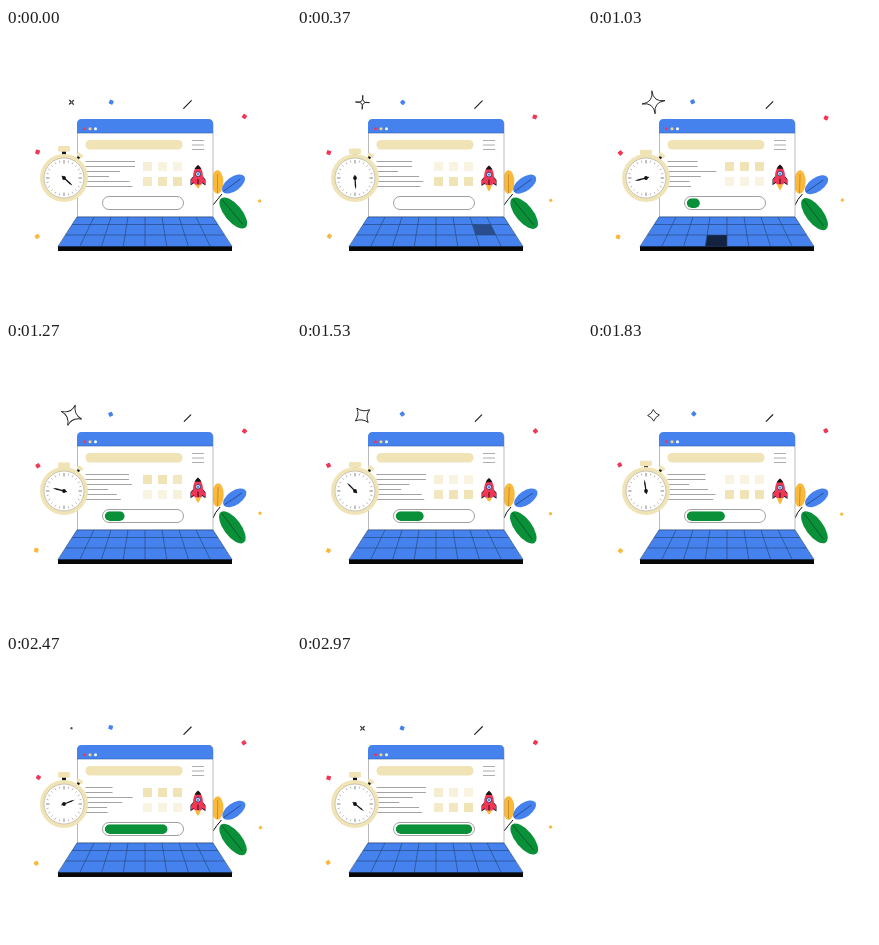
Write an HTML page that moves like this. It is 285 px wide and 285 px high and loops after 3 s.

```html
<!DOCTYPE html>
<html lang="en">
<head>
<meta charset="utf-8">
<title>Laptop loading</title>
<style>
html, body { margin: 0; width: 100%; height: 100%; overflow: hidden; background: #fff; }
svg { display: block; width: 100vw; height: 100vh; }
</style>
</head>
<body>
<svg viewBox="0 0 285 285">
  <!-- plant -->
  <g id="orange"><ellipse cx="211.500" cy="154" rx="5.800" ry="11.700" fill="#fbb93c"/><path d="M211.500 146V165" stroke="#a87419" stroke-width=".6"/></g>
  <g id="blue"><g transform="rotate(-36 227.500 156)"><ellipse cx="227.500" cy="156" rx="13.200" ry="7" fill="#4682ee"/><path d="M215 156H236" stroke="#1c3f80" stroke-width=".7"/></g></g>
  <g id="green"><g transform="rotate(50 227 185)"><ellipse cx="227" cy="185" rx="19" ry="8.600" fill="#0a9038"/><path d="M209 185H242" stroke="#064d20" stroke-width=".7"/></g></g>
  <path id="stem" fill="none" stroke="#111"/>

  <!-- screen -->
  <path d="M71.500 189V96Q71.500 91.500 76 91.500H202.500Q207 91.500 207 96V189Z" fill="#fff" stroke="#aaa" stroke-width=".8"/>
  <path d="M71 105V96Q71 91 76 91H202Q207 91 207 96V105Z" fill="#4682ee"/>
  <path d="M71 105H207" stroke="#2d5cab" stroke-width=".6"/>
  <circle cx="78.500" cy="100.700" r="1.500" fill="#f23656"/>
  <circle cx="84" cy="100.700" r="1.500" fill="#f3d58a"/>
  <circle cx="89.500" cy="100.700" r="1.500" fill="#fff"/>
  <rect x="79.500" y="112" width="97" height="9.500" rx="4.500" fill="#f0e4b7"/>
  <path d="M186 112.500H198M186 117H198M186 121.500H198" stroke="#999" stroke-width=".8"/>
  <g id="lines" stroke="#999" stroke-width=".9"></g>
  <g id="tiles" fill="#f0e4b7"></g>
  <rect x="96.500" y="168.500" width="81" height="13" rx="6.500" fill="#fff" stroke="#888" stroke-width=".8"/>
  <clipPath id="track"><rect x="98.700" y="170.300" width="76.600" height="9.700" rx="4.850"/></clipPath>
  <g clip-path="url(#track)"><rect id="bar" x="98.700" y="170.300" height="9.700" rx="4.850" fill="#0a9038"/></g>

  <!-- rocket -->
  <g id="rocket">
    <path id="flame" d="M189 155.500H195Q194.500 159 192 162Q189.500 159 189 155.500Z" fill="#fbb93c"/>
    <path d="M188 147L184.500 151V157L189 154ZM196 147L199.500 151V157L195 154Z" fill="#1b1b2b"/>
    <path d="M188 148L185 151.500V155.500L189 153ZM196 148L199 151.500V155.500L195 153Z" fill="#f23656"/>
    <path d="M192 136.500C197.500 141 198 149 195.500 156H188.500C186 149 186.500 141 192 136.500Z" fill="#f23656"/>
    <path d="M192 136.300Q194.300 138 195.400 140.500H188.600Q189.700 138 192 136.300Z" fill="#171717"/>
    <circle cx="192" cy="145.500" r="2.400" fill="#fff" stroke="#263d70" stroke-width=".9"/>
    <circle cx="192" cy="145.500" r="1.200" fill="#4682ee"/>
    <path d="M192 150.500V156" stroke="#171717"/>
  </g>

  <!-- keyboard -->
  <path d="M71 189H207L226 219H52Z" fill="#4682ee"/>
  <g id="keys"></g>
  <path id="grid" fill="none" stroke="#234983" stroke-width=".7"/>
  <rect x="52" y="218.500" width="174" height="4.500" fill="#080808"/>

  <!-- stopwatch -->
  <rect x="56" y="123" width="4" height="4" fill="#171717"/>
  <rect id="crown" x="52" y="118" width="12" height="5.700" rx="1.400" fill="#f0e4b7"/>
  <g transform="rotate(35 58 150)"><rect x="56.800" y="123" width="2.600" height="4" fill="#171717"/><rect x="54.800" y="120.500" width="6.400" height="3.500" rx="1" fill="#f0e4b7"/></g>
  <circle cx="58" cy="150" r="24" fill="#f0e4b7"/>
  <circle cx="58" cy="150" r="20" fill="#fff" stroke="#b5b0a0" stroke-width=".7"/>
  <g id="ticks" stroke="#777"></g>
  <path id="hand" d="M57.500 153L57.300 142L58 138.500L58.700 142L58.500 153Z" fill="#111"/>
  <circle cx="58" cy="150" r="1.900" fill="#111"/>

  <!-- confetti -->
  <path id="star" fill="#fff" stroke="#222" stroke-width=".9"/>
  <path id="stick" stroke="#222" stroke-width="1.200" stroke-linecap="round"/>
  <g id="bits"></g>
</svg>
<script>
const LOOP = 3000;
const $ = id => document.getElementById(id);
const add = (parent, tag, attrs) => {
  const el = document.createElementNS('http://www.w3.org/2000/svg', tag);
  set(el, attrs);
  return parent.appendChild(el);
};
function set(el, attrs) {
  for (const k in attrs) el.setAttribute(k, attrs[k]);
}
const clamp = (v, lo = 0, hi = 1) => Math.max(lo, Math.min(hi, v));
// Cosine that runs `cycles` times per loop and is 1 at time `peak`
const wave = (t, cycles, peak) => Math.cos(2 * Math.PI * cycles * (t - peak) / LOOP);

// Keyboard in perspective
const rows = [189, 196.5, 207, 218.5];
const keyX = (col, y) => {
  const spread = 19 * (y - 189) / 29.5;
  return 71 - spread + (136 + 2 * spread) * col / 8;
};
let grid = '';
for (const y of rows) grid += `M${keyX(0, y)} ${y}H${keyX(8, y)}`;
for (let c = 0; c <= 8; c++) grid += `M${keyX(c, 189)} 189L${keyX(c, 218.5)} 218.5`;
set($('grid'), { d: grid });

// Column, row and time of each key press
const keys = [[6, 1, 290], [3, 2, 1030], [4, 1, 2080], [1, 2, 2215]].map(([c, r, peak]) => {
  const y0 = rows[r], y1 = rows[r + 1];
  const d = `M${keyX(c, y0)} ${y0}H${keyX(c + 1, y0)}L${keyX(c + 1, y1)} ${y1}H${keyX(c, y1)}Z`;
  return { peak, el: add($('keys'), 'path', { d, fill: '#14233f' }) };
});

for (let i = 0; i < 24; i++) {
  const major = i % 6 === 0;
  add($('ticks'), 'path', {
    d: `M58 132V${major ? 135.5 : 134}`,
    'stroke-width': major ? .9 : .5,
    transform: `rotate(${i * 15} 58 150)`
  });
}

// Times at which each text line is longest
const lines = [0, 0, 1110, 620, 220, 150].map((peak, i) => ({
  peak, y: 133.5 + i * 5, el: add($('lines'), 'path', {})
}));

const tiles = [];
for (let r = 0; r < 2; r++) for (let c = 0; c < 3; c++) tiles.push({
  peak: (r ? 280 : 1020) + (1 - c) * 60,
  el: add($('tiles'), 'rect', { x: 137 + c * 15, y: 134 + r * 15, width: 9, height: 9 })
});

const bits = [
  [105.2, 73.6, 4.2, '#4682ee', .6],
  [32, 124.2, 4.2, '#f23656', .5],
  [238, 89.3, 4.2, '#f23656', .5],
  [31.2, 209, 4.2, '#fbb93c', 1.2],
  [254, 172.800, 3, '#fbb93c', .5]
].map(([x, y, size, fill, sway], i) => ({
  x, y, sway, peak: 370 + i * 500,
  el: add($('bits'), 'rect', { x: -size / 2, y: -size / 2, width: size, height: size, rx: .7, fill })
}));

// Four arms of length 1 with a hollow at `waist` between them
function star(size, waist) {
  const k = size * (waist * Math.SQRT2 - .5);
  return `M0 ${-size}Q${k} ${-k} ${size} 0Q${k} ${k} 0 ${size}Q${-k} ${k} ${-size} 0Q${-k} ${-k} 0 ${-size}Z`;
}

function draw(t) {
  const turn = t * 360 / LOOP;
  set($('hand'), { transform: `rotate(${132 + turn} 58 150)` });
  set($('crown'), { transform: `translate(0 ${3.7 * Math.max(0, Math.sin(Math.PI * t / 2000)) ** .6})` });
  set($('bar'), { width: 76.6 * clamp((t - 330) / 2470) ** 1.4 });
  for (const k of keys) set(k.el, { opacity: clamp(1.15 - Math.abs(t - k.peak) / 135) });
  for (const l of lines) set(l.el, { d: `M79.500 ${l.y}H${115 + 14 * wave(t, 2, l.peak)}` });
  for (const q of tiles) set(q.el, { opacity: clamp(.7 + .6 * wave(t, 2, q.peak), .4) });

  set($('rocket'), { transform: `translate(0 ${.6 + .5 * wave(t, 2, 370)})` });
  const stretch = .9 + .2 * wave(t, 4, 370);
  set($('flame'), { transform: `translate(0 ${155.5 * (1 - stretch)}) scale(1 ${stretch})` });

  const sway = (1 - wave(t, 1, 0)) / 2;
  set($('orange'), { transform: `rotate(${2 * sway} 211 166)` });
  set($('blue'), { transform: `translate(${sway} ${.5 * sway}) rotate(${2 * sway} 216 165)` });
  set($('green'), { transform: `translate(.3 ${.6 * sway}) rotate(${3.5 * sway} 213 169)` });
  set($('stem'), { d: `M207 177Q${211 - 2 * sway} ${172 - sway} ${216 - 2 * sway} 166` });

  set($('star'), {
    d: star(6.2 + 5.4 * wave(t, 1, 1050), .38 - .17 * wave(t, 1, 370)),
    transform: `translate(65.500 74.300) rotate(${turn - 42})`
  });
  const reach = 3.8 - .6 * sway;
  set($('stick'), { d: `M${-reach} ${reach}L${reach} ${-reach}`, transform: `translate(181.500 ${76.5 + .6 * sway})` });
  for (const b of bits) {
    const x = b.x + b.sway * wave(t, 2, b.peak);
    const y = b.y + .8 * wave(t, 1, b.peak);
    set(b.el, { transform: `translate(${x} ${y}) rotate(${40 + 25 * wave(t, 1, b.peak + 750)})` });
  }
}

const start = performance.now();
function tick() {
  draw((performance.now() - start) % LOOP);
  requestAnimationFrame(tick);
}
tick();
</script>
</body>
</html>
```
